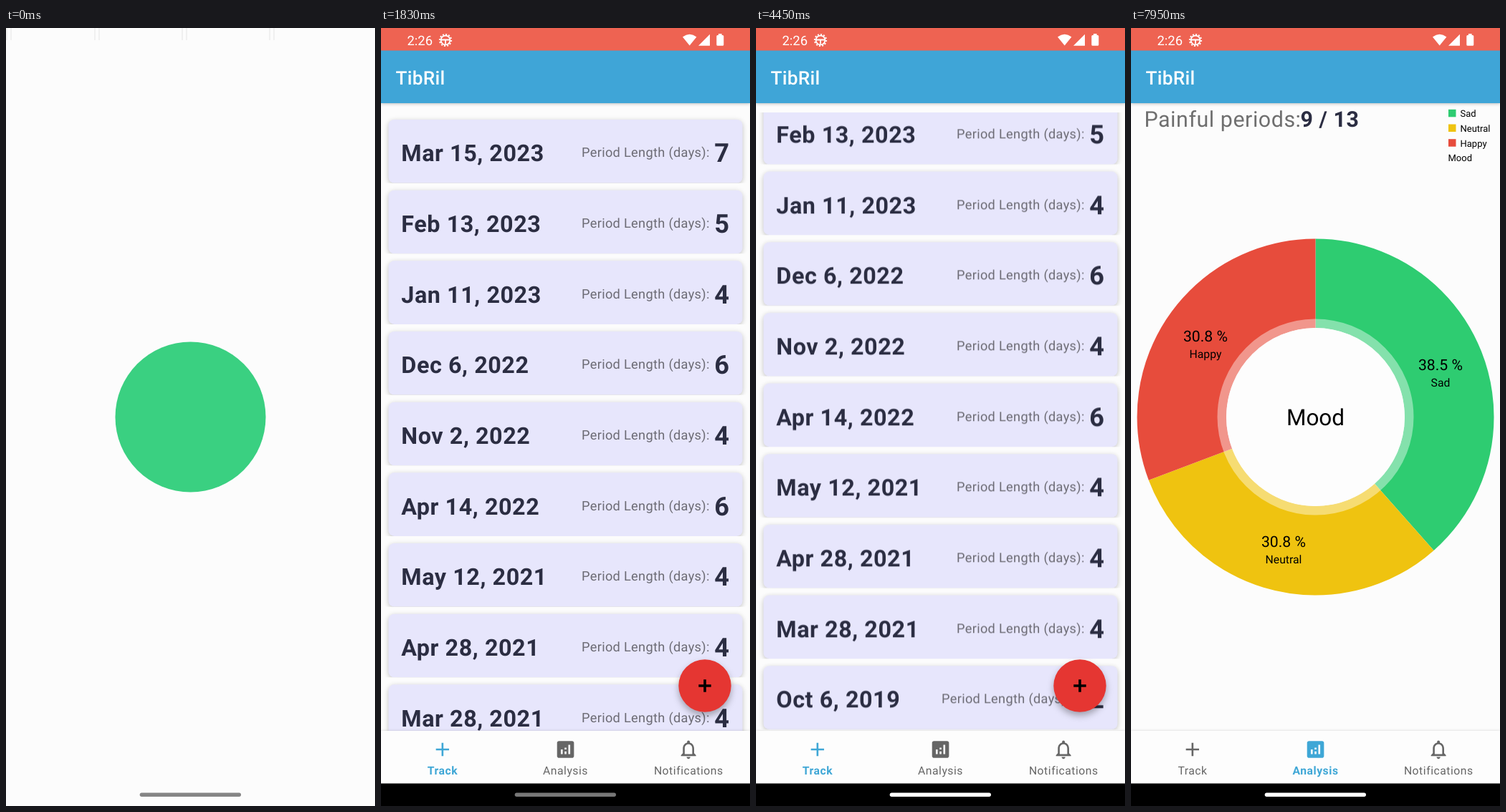
An HTML page that plays this animation: 515x1087 px, repeating every 8 s.

```html
<!DOCTYPE html>
<html lang="en">
<head>
<meta charset="utf-8">
<title>Period tracker</title>
<style>
  html, body { margin: 0; width: 100%; height: 100%; overflow: hidden; background: #fcfcfc; }
  svg { display: block; }
  text { font-family: Roboto, sans-serif; text-rendering: geometricPrecision; white-space: pre; }

  .lines, .logo, .status, .status-ink, .app, .handle, .list, .track, .analysis, .tab-a, .tab-b {
    animation: 8s linear infinite both;
  }
  .lines { animation-name: lines; animation-timing-function: step-end; }
  .logo { animation-name: logo; }
  .status { animation-name: status; }
  .status-ink { animation-name: status-ink; }
  .app { animation-name: app; }
  .handle { animation-name: handle; }
  .list { animation-name: scroll; }
  .track, .analysis, .tab-a, .tab-b { animation-timing-function: step-end; }
  .track { animation-name: track; }
  .analysis { animation-name: analysis; }
  .tab-a { animation-name: tab-a; }
  .tab-b { animation-name: tab-b; }

  @keyframes lines { 0% { opacity: 1; } 1%, 100% { opacity: 0; } }
  @keyframes logo {
    0% { fill: #3ad081; opacity: 1; }
    3.6% { fill: #3ad081; }
    8% { fill: #3ddc84; }
    14% { opacity: 1; }
    14.5% { opacity: .82; }
    16.75%, 100% { fill: #3ddc84; opacity: 0; }
  }
  @keyframes status { 0%, 3.6% { opacity: 0; } 5.5%, 100% { opacity: 1; } }
  @keyframes status-ink { 0%, 16.5% { fill: #656565; stroke: #656565; } 18.5%, 100% { fill: #fff; stroke: #fff; } }
  @keyframes app { 0%, 16.5% { opacity: 0; } 18.5%, 100% { opacity: 1; } }
  @keyframes handle {
    0%, 3.6% { fill: #858585; }
    8%, 16.5% { fill: #666; }
    18.5%, 24.5% { fill: #777; }
    28%, 100% { fill: #fff; }
  }
  @keyframes scroll {
    0%, 53.75% { transform: translateY(0); animation-timing-function: cubic-bezier(.3, .3, .25, 1); }
    64%, 100% { transform: translateY(-418.7px); }
  }
  @keyframes track { 0% { visibility: visible; } 71.75%, 100% { visibility: hidden; } }
  @keyframes analysis { 0% { visibility: hidden; } 71.75%, 100% { visibility: visible; } }
  @keyframes tab-a { 0% { fill: #3fa7d6; font-weight: 700; } 71.75%, 100% { fill: #666; font-weight: 400; } }
  @keyframes tab-b { 0% { fill: #666; font-weight: 400; } 71.75%, 100% { fill: #3fa7d6; font-weight: 700; } }

  .card { fill: #e7e6fc; filter: drop-shadow(0 2px 3.5px rgba(0, 0, 0, .24)); }
  .date, .count, .score { fill: #2b2d42; font-weight: 700; letter-spacing: .0178em; }
  .date { font-size: 32.3px; }
  .count { font-size: 36.2px; }
  .hint { fill: #6c6b74; font-size: 18.2px; letter-spacing: .0178em; }
  .score, .pain { font-size: 30.4px; letter-spacing: .0178em; }
  .pain { fill: #6f6f6f; }
  .title { fill: #fff; font-size: 26.2px; font-weight: 500; letter-spacing: .0125em; }
  .clock { font-size: 18.4px; stroke: none; }
  .nav { font-size: 15.74px; letter-spacing: .0333em; text-anchor: middle; }
  .bar { filter: drop-shadow(0 1px 2px rgba(0, 0, 0, .25)); }
  .fab { fill: #e53632; filter: drop-shadow(0 5px 5px rgba(0, 0, 0, .3)); }
  .slices circle { fill: none; stroke-width: 124.5; }
  .mid { text-anchor: middle; }
  .pct { font-size: 21.2px; }
  .name { font-size: 15.74px; }
  .mood { font-size: 31.5px; }
  .key { font-size: 13px; }
</style>
</head>
<body>
<svg id="stage" width="515" height="1087" viewBox="0 0 515 1087">
  <rect width="515" height="1087" fill="#fcfcfc"/>
  <path class="lines" d="M1 0v17M7 0v17M124 0v17M130 0v17M246 0v17M252 0v17M368 0v17M374 0v17" stroke="#e4e4e4"/>
  <circle class="logo" cx="257.5" cy="543.5" r="105"/>

  <g class="app">
    <rect width="515" height="1087" fill="#fcfcfc"/>

    <g class="track">
      <svg y="118" width="515" height="864"><g class="list" id="list"></g></svg>
      <circle class="fab" cx="452" cy="919" r="36.7"/>
      <path d="M443.3 919h17.4M452 910.3v17.4" stroke="#000" stroke-width="3.6"/>
    </g>

    <g class="analysis">
      <text class="pain" x="18.5" y="138">Painful periods:</text>
      <text class="score" x="236.5" y="138">9 / 13</text>
      <g class="slices" id="slices" transform="rotate(-90 257.5 543.5)"></g>
      <circle cx="257.5" cy="543.5" r="130.75" fill="none" stroke="#fff" stroke-opacity=".41" stroke-width="12.5"/>
      <circle cx="257.5" cy="543.5" r="124.5" fill="#fdfdfd"/>
      <text class="mid mood" x="257.5" y="554.5">Mood</text>
      <g id="labels"></g>
      <text class="key" x="442.5" y="186">Mood</text>
    </g>

    <rect class="bar" y="31" width="515" height="74" fill="#3fa5d7"/>
    <rect width="515" height="31.5" fill="#ee6352"/>
    <text class="title" x="20.5" y="78.5">TibRil</text>

    <rect class="bar" y="982" width="515" height="74" fill="#fdfdfd"/>
    <g class="nav">
      <g class="tab-a">
        <path transform="translate(70.1 992.3) scale(1.311)" d="M19 13h-6v6h-2v-6H5v-2h6V5h2v6h6z"/>
        <text x="86" y="1042.5">Track</text>
      </g>
      <g class="tab-b">
        <path transform="translate(241.8 992.3) scale(1.311)" d="M19 3H5c-1.1 0-2 .9-2 2v14c0 1.1.9 2 2 2h14c1.1 0 2-.9 2-2V5c0-1.1-.9-2-2-2zM9 17H7v-5h2zm4 0h-2v-3h2zm0-5h-2v-2h2zm4 5h-2V7h2z"/>
        <text x="257.5" y="1042.5">Analysis</text>
      </g>
      <g fill="#666">
        <path transform="translate(413.4 992.3) scale(1.311)" d="M12 22c1.1 0 2-.9 2-2h-4c0 1.1.9 2 2 2zm6-6v-5c0-3.07-1.63-5.64-4.5-6.32V4c0-.83-.67-1.5-1.5-1.5s-1.5.67-1.5 1.5v.68C7.64 5.36 6 7.92 6 11v5l-2 2v1h16v-1zm-2 1H8v-6c0-2.48 1.51-4.5 4-4.5s4 2.02 4 4.5z"/>
        <text x="429.3" y="1042.5">Notifications</text>
      </g>
    </g>
    <rect y="1055.5" width="515" height="32" fill="#000"/>
  </g>

  <g class="status">
    <g class="status-ink">
      <text class="clock" x="36.5" y="24">2:26</text>
      <g fill="none" stroke-width="1.8">
        <circle cx="90" cy="17" r="6.4"/>
        <circle cx="90" cy="17" r="8.2" pathLength="24" stroke-dasharray="1"/>
        <path d="M84 16.5h12M90 17v5.5"/>
      </g>
      <g stroke="none">
        <path d="M421 12.4Q430.7 5 440.4 12.4L430.7 24.5Z"/>
        <path d="M459 8.7V24.7H443Z"/>
        <path d="M471 8h4.6v2h1.2q1.5 0 1.5 1.5v11.7q0 1.5-1.5 1.5h-7q-1.5 0-1.5-1.5V11.5q0-1.5 1.5-1.5h1.2z"/>
      </g>
    </g>
  </g>
  <rect class="handle" x="186.7" y="1068.6" width="141.3" height="5.4" rx="2.7"/>
</svg>

<script>
  const byId = id => document.getElementById(id);
  const ROW = 98.67;

  const periods = [
    ["Mar 15, 2023", 7], ["Feb 13, 2023", 5], ["Jan 11, 2023", 4], ["Dec 6, 2022", 6],
    ["Nov 2, 2022", 4], ["Apr 14, 2022", 6], ["May 12, 2021", 4], ["Apr 28, 2021", 4],
    ["Mar 28, 2021", 4], ["Oct 6, 2019", 12], ["Dec 21, 2018", 9], ["Jun 14, 2017", 3],
    ["Jun 2, 2017", 7]
  ];

  // Each row clips the shadow of its own card.
  byId("list").innerHTML = periods.map(([date, days], i) => `
    <svg y="${i * ROW}" width="515" height="${ROW}">
      <rect class="card" x="10.5" y="10" width="494" height="88.6" rx="8"/>
      <text class="date" x="28.3" y="68.3">${date}</text>
      <text class="hint" x="${days > 9 ? 259 : 280}" y="62.2">Period Length (days):</text>
      <text class="count" x="486.6" y="69.4" text-anchor="end">${days}</text>
    </svg>`).join("");

  const moods = [
    { name: "Sad", color: "#2ecc71", share: 5, x: 432, y: 477.5 },
    { name: "Neutral", color: "#efc310", share: 4, x: 213, y: 725 },
    { name: "Happy", color: "#e74c3c", share: 4, x: 104, y: 438 }
  ];

  let start = 0;
  moods.forEach(({ name, color, share, x, y }, i) => {
    const top = 113.8 + i * 20.7;
    byId("slices").innerHTML += `<circle cx="257.5" cy="543.5" r="186.75" pathLength="13"
      stroke="${color}" stroke-dasharray="${share} 13" stroke-dashoffset="${-start}"/>`;
    byId("labels").innerHTML += `
      <text class="mid pct" x="${x}" y="${y}">${(share / 13 * 100).toFixed(1)} %</text>
      <text class="mid name" x="${x}" y="${y + 23}">${name}</text>
      <rect x="443" y="${top}" width="10.5" height="10.5" fill="${color}"/>
      <text class="key" x="459.5" y="${top + 10.4}">${name}</text>`;
    start += share;
  });
</script>
</body>
</html>
```
